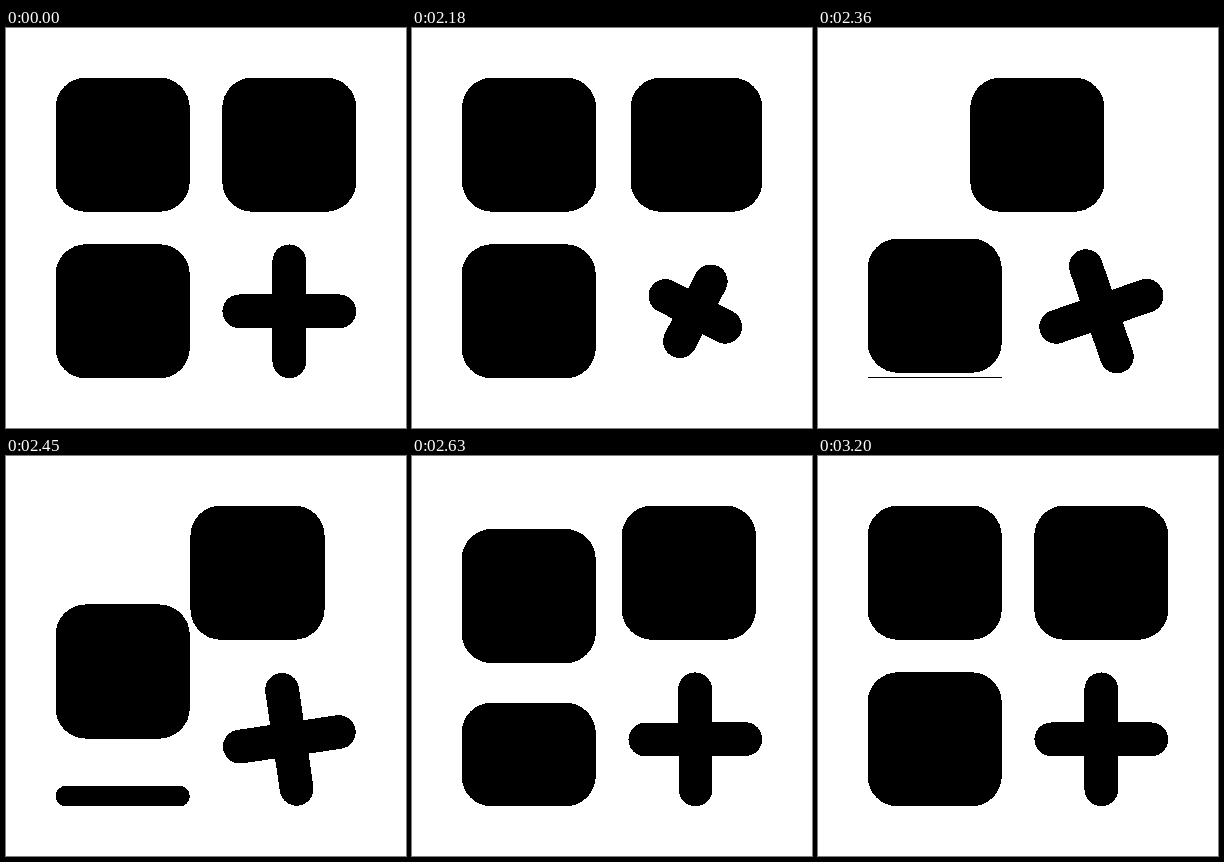
Write an HTML page that moves like this. It is 400 px wide and 400 px high and loops after 3260 ms.

```html
<!DOCTYPE html>
<html lang="en">
<head>
<meta charset="utf-8">
<title>Tiles</title>
<style>
  html, body { margin: 0; width: 100%; height: 100%; overflow: hidden; background: #fff; }
  svg { display: block; width: 100vw; height: 100vh; }
</style>
</head>
<body>
<svg viewBox="0 0 400 400" shape-rendering="crispEdges">
  <rect id="right"/>
  <rect id="left"/>
  <rect id="fresh"/>
  <rect id="low"/>
  <path id="plus" fill="none" stroke="#000" stroke-width="33.8" stroke-linecap="round"/>
</svg>
<script>
const LOOP = 3260, START = 2000, STEP = 30;
const SIDE = 400 / 3, NEAR = 50, FAR = 650 / 3, EDGE = 350, R = 30;
const MID = 850 / 3, ARM = 50, SHORT = 100 / 3;
const GROW = 0.45; // hard edges also cover partly filled pixels
const $ = id => document.getElementById(id);
const mix = (a, b, p) => a + (b - a) * p;

// Cubic Bezier easing, solved by bisection
function bezier(x1, y1, x2, y2) {
  const at = (a, b, u) => 3 * a * u * (1 - u) ** 2 + 3 * b * u * u * (1 - u) + u ** 3;
  return x => {
    if (x <= 0) return 0;
    if (x >= 1) return 1;
    let lo = 0, hi = 1;
    for (let i = 0; i < 30; i++) {
      const u = (lo + hi) / 2;
      if (at(x1, x2, u) < x) lo = u; else hi = u;
    }
    return at(y1, y2, lo);
  };
}

const glide = bezier(1 / 3, 0, 0, 1);
const spin = bezier(1 / 3, 0, 0.28, 1);
const soft = bezier(1 / 3, 0, 2 / 3, 1);
const speedUp = bezier(0.42, 0, 1, 1);
const phase = (t, from, to, ease) => ease((t - from) / (to - from));

function box(id, x, y, w, h) {
  const el = $(id), r = Math.min(R, w / 2, h / 2) + GROW;
  const attrs = {
    x: x - GROW, y: y - GROW, width: w + 2 * GROW, height: h + 2 * GROW, rx: r, ry: r
  };
  for (const k in attrs) el.setAttribute(k, attrs[k].toFixed(3));
  el.setAttribute('visibility', w > 0 && h > 0 ? 'visible' : 'hidden');
}

function draw(time) {
  const t = Math.floor((time % LOOP - START) / STEP) * STEP;

  const w = SIDE * (1 - phase(t, 161, 348, speedUp));
  box('right', EDGE - w, NEAR, w, SIDE);
  box('left', mix(NEAR, FAR, phase(t, 161, 833, glide)), NEAR, SIDE, SIDE);
  box('low', NEAR, mix(FAR, NEAR, phase(t, 300, 975, glide)), SIDE, SIDE);
  const h = SIDE * phase(t, 336, 1079, glide);
  box('fresh', NEAR, EDGE - h, SIDE, h);

  const dip = phase(t, 0, 160, soft) - phase(t, 160, 420, soft);
  const a = mix(ARM, SHORT, dip);
  $('plus').setAttribute('d', `M0 ${-a}V${a}M${-a} 0H${a}`);
  $('plus').setAttribute('transform',
    `translate(${MID} ${MID}) rotate(${90 * phase(t, 0, 674, spin)})`);
}

function tick() {
  draw(performance.now());
  requestAnimationFrame(tick);
}
draw(0);
requestAnimationFrame(tick);
</script>
</body>
</html>
```
